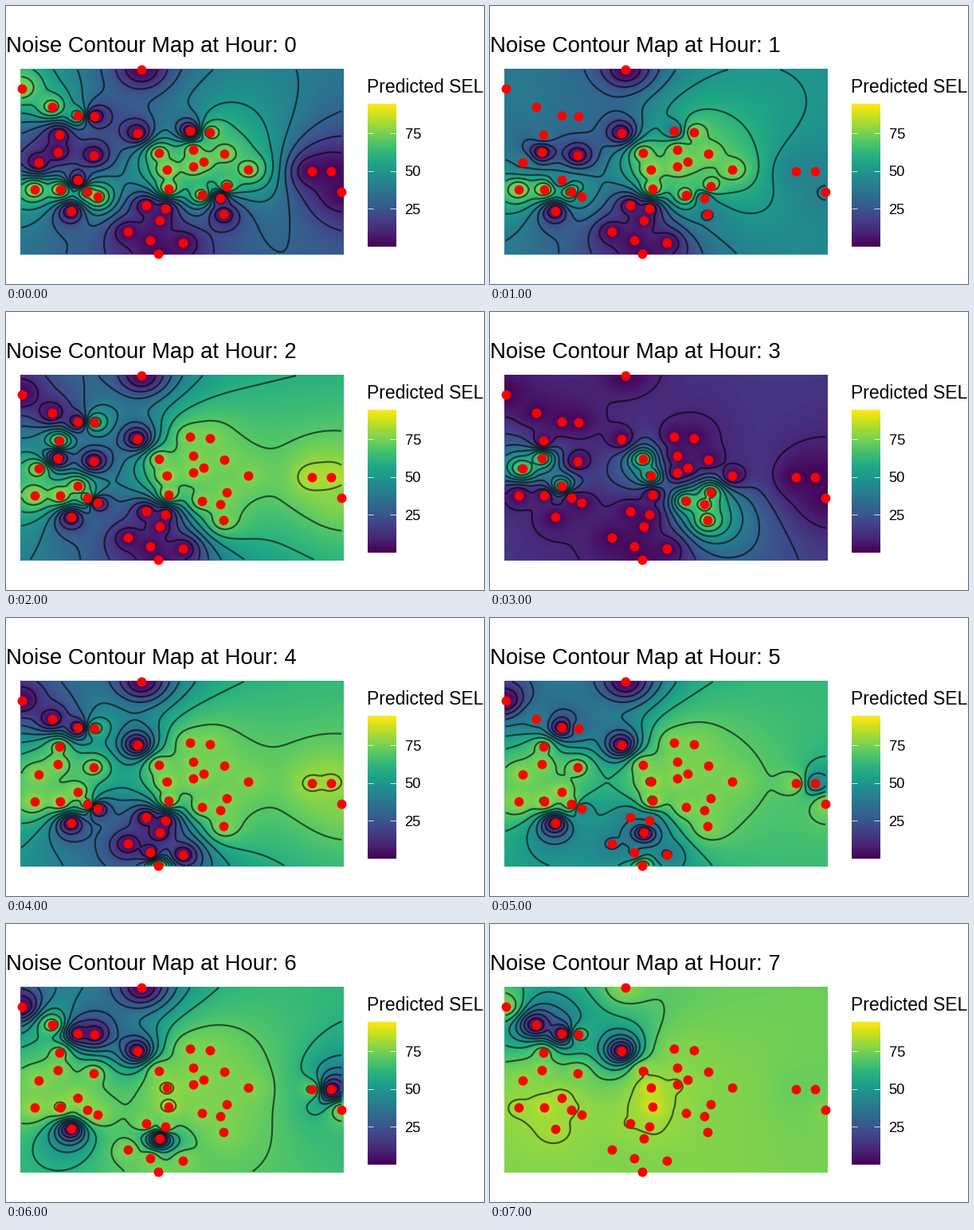
A matplotlib script for the animation above (8000 ms loop, 600 px wide and 350 px high).

```python
import numpy as np
import matplotlib.pyplot as plt
from matplotlib.animation import FuncAnimation

W, H = 600, 350
PT = 0.72  # points per pixel at 100 dpi
BASE = 22.92
VMAX = 94.7
QUIET, LOUD = 1, 76.5
POWER, STRETCH = 2.3, 1.2  # distance decay, horizontal stretch of the metric

plt.rcParams["font.family"] = "Liberation Sans"

# Monitoring sites by district, in stage pixels
DISTRICTS = {
    "corner": [(20, 104), (58, 127.5), (90.5, 138)],
    "gap": [(111, 139)],
    "northwest": [(67, 162.5), (65, 184), (41, 197.5), (110, 188)],
    "west": [(36.5, 231), (68.5, 231), (90, 219.5), (102.5, 234.5), (115, 240.5)],
    "lone": [(82, 258.5)],
    "north": [(165, 160), (170.5, 80.5)],
    "core": [(192.5, 185.5), (202, 206.5), (204, 230)],
    "ridge": [(231, 157.5), (256.5, 159)],
    "middle": [(235, 181), (235, 202.5), (248, 196.5), (274.5, 186), (304.5, 206.5)],
    "slope": [(277, 227), (246, 238), (269, 242.5), (273, 262.5)],
    "south": [(176.5, 251.5), (200, 255.5), (193, 270.5), (153.5, 284.5),
              (181, 295.5), (222, 298), (191.5, 312)],
    "east": [(384, 208.5), (408.5, 208.5), (421.5, 234.5)],
}
SITES = np.array(sum(DISTRICTS.values(), [])) - 0.4
KEYS = [(name, i) for name, group in DISTRICTS.items() for i in range(len(group))]

# Noise centres: x, y, radius
CENTRES = [(70, 232, 40), (204, 222, 35), (396, 208, 25)]
DIP = (100, 145, 30)

# Per hour: extra level at each centre, and the silent districts or sites
HOURS = {
    0: ((5, 6, 0), ["gap", "northwest", ("west", 2), "lone", "north",
                    ("ridge", 0), ("slope", 2), ("slope", 3), "south", "east"]),
    2: ((5, 6, 9), ["corner", ("northwest", 1), ("northwest", 3), ("west", 4),
                    "lone", "north", "south"]),
    3: ((-14, -14, 0), ["corner", "gap", ("northwest", 0), ("northwest", 3),
                        ("west", 0), ("west", 1), ("west", 3), ("west", 4),
                        "lone", "north", ("core", 2), "ridge", "middle",
                        "south", "east"]),
    4: ((5, 6, 6), ["corner", ("west", 4), "lone", "north"]
        + [("south", i) for i in range(6)]),
    6: ((6, 7, -6), [("corner", 0), ("corner", 2), "gap", "lone", "north",
                     ("south", 2), ("east", 1)]),
    7: ((9, 14, -5), [("corner", 1), ("corner", 2), ("north", 0)]),
}


def bump(x, y, radius):
    d2 = ((SITES - (x, y)) ** 2).sum(axis=1)
    return np.exp(-d2 / radius ** 2)


def levels(hour):
    if hour not in HOURS:
        return (levels(hour - 1) + levels(hour + 1)) / 2
    gains, silent = HOURS[hour]
    loud = LOUD - 12 * bump(*DIP)
    for gain, centre in zip(gains, CENTRES):
        loud = loud + gain * bump(*centre)
    hushed = [key in silent or key[0] in silent for key in KEYS]
    return np.where(hushed, QUIET, loud)


# Inverse distance weights on a grid spanning the sites
N = 100
(x0, y0), (x1, y1) = SITES.min(axis=0), SITES.max(axis=0)
gx, gy = np.linspace(x0, x1, N), np.linspace(y0, y1, N)
X, Y = np.meshgrid(gx, gy)
dist2 = (((X[..., None] - SITES[:, 0]) / STRETCH) ** 2
         + (Y[..., None] - SITES[:, 1]) ** 2 + 1e-6)
weights = dist2 ** (-POWER / 2)
weights /= weights.sum(axis=-1, keepdims=True)
hx, hy = (gx[1] - gx[0]) / 2, (gy[1] - gy[0]) / 2
EXTENT = (x0 - hx, x1 + hx, y1 + hy, y0 - hy)

fig = plt.figure(figsize=(W / 100, H / 100), dpi=100, facecolor="white")
ax = fig.add_axes([0, 0, 1, 1])


def label(x, y, text, size):
    ax.text(x, y, text, fontsize=size * PT, color="black",
            ha="left", va="baseline")


def draw_legend():
    left, right, top, bottom = 453.5, 489.5, 122.8, 302.8
    ramp = np.linspace(1, 0, 256)[:, None]
    ax.imshow(ramp, extent=(left, right, bottom, top), cmap="viridis",
              vmin=0, vmax=1, aspect="auto", interpolation="bilinear")
    label(453, 109, "Predicted SEL", BASE)
    for value in (25, 50, 75):
        y = bottom - value / VMAX * (bottom - top)
        for a, b in ((left, left + 7.2), (right - 7.2, right)):
            ax.plot([a, b], [y, y], color="white", lw=0.8 * PT,
                    solid_capstyle="butt")
        label(500.5, y + 6.6, str(value), 0.8 * BASE)


def draw(hour):
    ax.clear()
    ax.axis("off")
    field = weights @ levels(hour)
    ax.imshow(field, extent=EXTENT, cmap="viridis", vmin=0, vmax=VMAX,
              aspect="auto", interpolation="bilinear")
    ax.contour(gx, gy, field, levels=np.arange(10, 100, 10), colors="black",
               alpha=0.6, linewidths=2.2 * PT)
    ax.scatter(*SITES.T, s=(11.9 * PT) ** 2, color="red", linewidths=0,
               zorder=5, clip_on=False)
    label(0, 58, f"Noise Contour Map at Hour: {hour}", 1.2 * BASE)
    draw_legend()
    ax.set_xlim(0, W)
    ax.set_ylim(H, 0)
    return []


anim = FuncAnimation(fig, draw, frames=8, interval=1000, repeat=True,
                     repeat_delay=0, init_func=lambda: draw(0))
plt.show()
```
